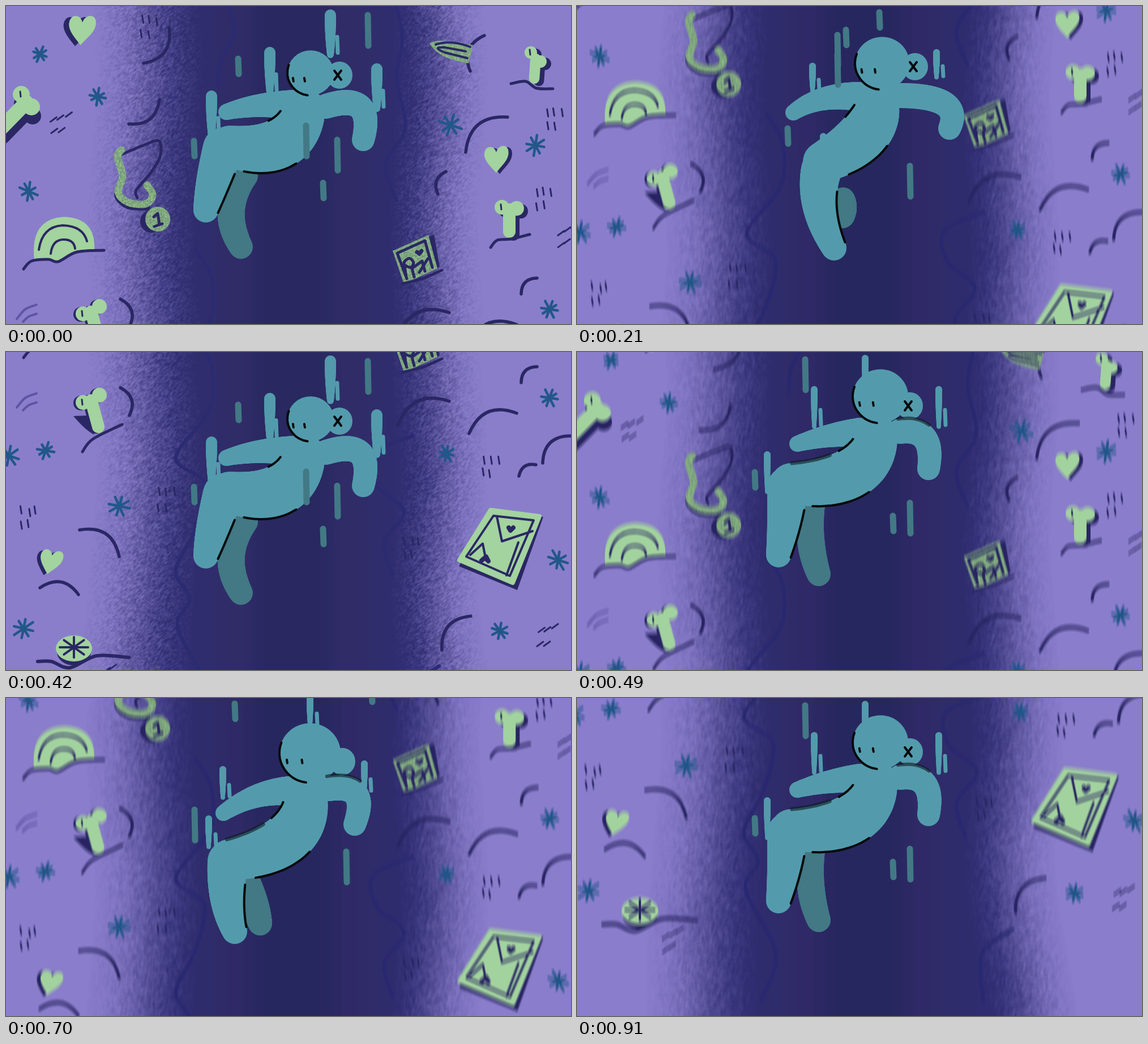
An HTML page with a canvas that plays this animation: 998 px wide and 561 px high, repeating every 980 ms.

```html
<!DOCTYPE html>
<html lang="en">
<head>
<meta charset="utf-8">
<title>Falling</title>
<style>
html, body { margin: 0; width: 100%; height: 100%; overflow: hidden; background: #8a7ecb; }
canvas { display: block; width: 998px; height: 561px; }
</style>
</head>
<body>
<canvas id="stage" width="998" height="561"></canvas>
<script>
const W = 998, H = 561, DEPTH = 1200, STEP = 70, PASS = 7;
const SKIN = '#539bac', SHADE = '#427985', NAVY = '#2a2764', GREEN = '#a3d39e', BLUE = '#225789', INK = '#060a0c';

let seed = 7;
const rnd = () => (seed = (seed * 16807) % 2147483647) / 2147483647;
const clamp = v => Math.max(0, Math.min(1, v));
const points = s => s.split(' ').map(p => p.split(',').map(Number));

function makeCanvas(w, h) {
  const c = document.createElement('canvas');
  c.width = w; c.height = h;
  return c.getContext('2d');
}

function pen(g, path, width, color) {
  g.lineCap = g.lineJoin = 'round';
  g.lineWidth = width;
  g.strokeStyle = color;
  g.stroke(path);
}

// Smooth open curve through points
function line(g, p, width, color) {
  const path = new Path2D(), at = i => p[Math.max(0, Math.min(p.length - 1, i))];
  path.moveTo(...p[0]);
  for (let i = 0; i < p.length - 1; i++) {
    const [a, b, c, d] = [at(i - 1), at(i), at(i + 1), at(i + 2)];
    path.bezierCurveTo(b[0] + (c[0] - a[0]) / 6, b[1] + (c[1] - a[1]) / 6,
      c[0] - (d[0] - b[0]) / 6, c[1] - (d[1] - b[1]) / 6, c[0], c[1]);
  }
  pen(g, path, width, color);
}

function oval(g, x, y, rx, ry, color) {
  g.fillStyle = color;
  g.beginPath();
  g.ellipse(x, y, rx, ry, 0, 0, 7);
  g.fill();
}

function fillPath(g, d, color) {
  g.fillStyle = color;
  g.fill(new Path2D(d));
}

/* ---------- tunnel ---------- */

function paintWalls(g) {
  const w = W / 2, h = DEPTH / 2, n = makeCanvas(w, h), img = n.createImageData(w, h);
  const lav = [138, 126, 203];
  const noise = () => Array.from({ length: w + 1 }, rnd);
  let above = noise();
  for (let j = 0; j < h; j++) {
    const row = noise(), bend = 8 * Math.sin(j / 42), deep = clamp((j - 440) / 130) * 25;
    for (let i = 0; i < w; i++) {
      const x = i * 2, mid = Math.abs(x - 505);
      const u = x < 500 ? clamp((342 - deep + bend - x) / 192) : clamp((x - 684 - deep - bend) / 158);
      const grain = row[i] * .6 + above[i + 1] * .4 - .5;
      const v = clamp(u * u * (3 - 2 * u) + grain * .75 * Math.pow(4 * u * (1 - u), .6));
      const core = clamp((90 - mid) / 45), rim = clamp((mid - 110) / 90);
      const dark = [48 - 7 * core, 44 - 4 * core + 2 * rim, 104 - 8 * core + 10 * rim];
      const o = (j * w + i) * 4;
      dark.forEach((c, k) => img.data[o + k] = c + (lav[k] - c) * v);
      img.data[o + 3] = 255;
    }
    above = row;
  }
  n.putImageData(img, 0, 0);
  g.drawImage(n.canvas, 0, 0, W, DEPTH);
}

function grainyGreen() {
  const t = makeCanvas(96, 96);
  t.fillStyle = '#82aa7d';
  t.fillRect(0, 0, 96, 96);
  for (let i = 0; i < 1400; i++) {
    t.fillStyle = rnd() < .5 ? '#93c08e' : '#6f917a';
    t.fillRect(rnd() * 96, rnd() * 96, 2, 2);
  }
  return t.createPattern(t.canvas, 'repeat');
}

function star(g, x, y) {
  const r = 14 + rnd() * 6;
  for (let i = 0; i < 4; i++) {
    const a = i * Math.PI / 4 + .15 + rnd() * .25, q = r * (.8 + rnd() * .3);
    const dx = Math.cos(a) * q, dy = Math.sin(a) * q;
    line(g, [[x - dx, y - dy], [x + dx, y + dy]], 4.5, BLUE);
  }
}

// Bow from a to b, bulging to the left of the way
function bow(g, [ax, ay], [bx, by]) {
  const dx = bx - ax, dy = by - ay, p = new Path2D();
  p.moveTo(ax, ay);
  p.quadraticCurveTo((ax + bx) / 2 + dy * .48, (ay + by) / 2 - dx * .48, bx, by);
  pen(g, p, 5.5, NAVY);
}

// Two short rows of scratches
function scratches(g, x, y, slant) {
  for (let i = 0; i < 5; i++) {
    const px = x + (i % 3 - 1) * 13 + rnd() * 4, py = y + (i > 2 ? 12 : -12) + rnd() * 6 - slant * (i % 3) * 5;
    line(g, [[px, py], [px + 2 + slant * 9, py + 13 - slant * 21]], 3, NAVY);
  }
}

// Paints a shape twice: shadow, then face
function raised(g, dx, dy, paint) {
  [[dx, dy, NAVY], [0, 0, GREEN]].forEach(([x, y, color]) => {
    g.save();
    g.translate(x, y);
    paint(color);
    g.restore();
  });
}

function heart(g, x, y, s, tilt, side) {
  raised(g, side * 8, 2, color => {
    g.translate(x, y);
    g.rotate(tilt);
    g.scale(s, s);
    fillPath(g, 'M0 28C-12 15-26 2-23-12C-20-26-4-26 0-12C4-28 24-30 24-12C24 4 10 14 0 28', color);
  });
}

function bone(g, a, b, end, r, dx, dy) {
  raised(g, dx, dy, color => {
    oval(g, ...a, r, r, color);
    oval(g, ...b, r, r, color);
    line(g, [[(a[0] + b[0]) / 2, (a[1] + b[1]) / 2 + 3], end], r * 1.7, color);
  });
  line(g, [[a[0] - 2, a[1] - 5], [a[0] - 1, a[1] + 4]], 3, NAVY);
}

function paintThings(g) {
  const dull = grainyGreen();
  const ink = (s, w = 5) => line(g, points(s), w, NAVY);
  const draw = (d, w = 4, color = NAVY) => pen(g, new Path2D(d), w, color);

  // wall contours
  ['395,0 402,50 378,100 374,140', '335,430 363,480 360,555 300,640 350,685 335,765 300,840 325,890 303,940 355,1050 330,1130',
   '690,0 700,60 690,130 705,215 670,280 690,343', '718,602 648,635 655,690 703,735 668,790 683,848', '765,1008 712,1050 714,1132']
    .forEach(s => line(g, points(s), 6, '#2b2b72'));

  ['288,38 243,101', '271,165 217,208', '202,517 218,566', '130,768 200,815', '60,870 128,882',
   '820,115 845,52', '812,258 886,196', '763,332 777,292', '910,508 938,480', '692,584 783,541',
   '818,598 902,562', '948,650 998,602', '906,673 936,653', '770,980 821,920']
    .forEach(s => bow(g, ...points(s)));

  points('250,28 966,190 947,330 280,705 37,738 853,647 714,790').forEach(p => scratches(g, ...p, 0));
  points('90,212 985,412 950,960 170,1032').forEach(p => scratches(g, ...p, 1));
  for (let i = 0; i < 2; i++)
    line(g, [[19 + i * 11, 552 + i * 5], [34 + i * 6, 535 + i * 13], [54, 527 + i * 16]], 4, '#5f54a4');

  points('60,85 162,160 40,327 5,637 70,628 200,726 31,942 785,210 935,246 960,535 778,633 975,821 872,946')
    .forEach(p => star(g, ...p));

  heart(g, 134, 41, 1, .08, -1.2);
  heart(g, 79, 823, .84, .25, -.8);
  heart(g, 866, 269, .9, 0, .8);

  bone(g, [27, 156], [45, 178], [-8, 215], 15, 2, 16);
  bone(g, [927, 82], [944, 98], [933, 128], 11, 8, 4);
  ink('892,137 918,133 937,145 966,146');
  bone(g, [876, 355], [902, 357], [889, 398], 13, 7, 5);
  ink('856,426 868,413 892,411 925,403');
  fillPath(g, 'M119 567L148 566L156 600Q140 592 119 567Z', NAVY);
  bone(g, [136, 543], [165, 530], [163, 586], 13, -4, 1);
  ink('135,630 153,608 205,582');

  // medal
  ink('204,262 240,247 270,238 272,266 255,295 230,325 232,338');
  line(g, points('206,308 196,334 215,353 250,356'), 10, NAVY);
  line(g, points('204,254 197,266 206,300 198,328 215,346 247,349 259,333 249,316'), 13, dull);
  oval(g, 257, 380, 20, 20, NAVY);
  oval(g, 268, 376, 22, 22, dull);
  draw('M261 372L268 366L271 385M262 389L276 384', 5);

  // rainbow
  fillPath(g, 'M50 448Q42 375 103 372Q160 374 156 433L125 432L92 449Z', GREEN);
  draw('M58 430Q64 389 100 387Q136 388 143 415M79 437Q82 412 102 412Q120 412 122 428');
  ink('31,464 45,450 75,447 92,451 125,434 173,431');

  // ball
  oval(g, 120, 983, 30, 24, NAVY);
  oval(g, 120, 977, 32, 23, GREEN);
  for (let a = 0; a < 6.2; a += Math.PI / 4)
    line(g, [[120, 975], [120 + 25 * Math.cos(a), 975 + 18 * Math.sin(a)]], 4, NAVY);
  ink('56,1000 80,1000 113,1011 160,990 217,993', 6);

  // shell
  fillPath(g, 'M748 66Q762 55 825 69L817 101Q765 94 748 66Z', dull);
  draw('M759 68Q785 59 820 72M812 80L775 73Q750 72 775 82L815 92', 4);

  // framed picture
  fillPath(g, 'M696 432L756 403L766 460L708 488Z', NAVY);
  fillPath(g, 'M683 432L746 404L762 463L703 490Z', dull);
  draw('M708 481L691 436L740 414L753 461M707 478L703 452Q714 438 720 453Q718 466 706 458M721 478L717 463L735 450L740 468M730 470L745 446', 5);
  draw('M726 434L730 437L734 432', 7);
  ink('700,490 735,481 770,466');

  // letter
  fillPath(g, 'M856 733L949 745L903 874L800 832Z', NAVY);
  const sheet = 'M856 733L942 744L895 861L801 821Z';
  fillPath(g, sheet, GREEN);
  draw(sheet, 8, GREEN);
  draw('M861 743L932 751L890 849L813 815Z');
  draw('M867 744L876 788L930 770M820 812L842 792L848 822M905 790L884 848');
  draw('M840 822L848 815L852 823M888 764L891 769L896 764', 8);
}

/* ---------- faller ---------- */

// Joints: rear arm, front arm, torso, leg, far leg (three each), snout, head with radius
const sink = {
  joints: points('508,174 445,176 389,187 565,177 625,178 631,236 528,182 483,243 395,247 384,250 366,310 353,360 425,300 398,360 415,425 589,122 538,118,41'),
  drips: points('573,16 466,82 363,159 655,111'), fall: 70, bulb: 10,
  rain: points('639,16 410,93 585,236 332,238 530,211 560,312'), cross: true
};
const rise = {
  joints: points('500,142 445,148 389,162 570,140 614,152 621,206 530,148 484,214 378,232 372,238 366,300 356,358 418,270 413,330 427,392 588,95 536,78,49'),
  drips: points('509,11 419,66 336,181 639,66'), fall: 66, bulb: 6,
  rain: points('403,13 314,212 588,266 558,289'), cross: true, soft: true
};
const tip = {
  joints: points('500,161 443,172 400,193 570,157 615,166 613,211 530,165 500,236 410,268 407,272 407,335 421,385 442,305 450,345 458,373 591,111 539,99,51'),
  drips: points('538,3 398,123 376,205 627,115'), fall: 48, bulb: 6,
  rain: points('352,188 418,11 599,257 639,-14'), soft: true
};
const turn = {
  joints: points('500,160 435,164 382,188 565,158 648,172 658,216 530,165 508,225 435,275 432,288 429,355 454,427 470,340 470,355 469,371 597,107 539,101,48'),
  drips: points('539,90 416,106 435,230 635,82'), fall: 44, bulb: 6,
  rain: points('460,51 475,42 588,282 534,11 460,85 372,216'), cross: true
};
const drop = {
  joints: points('500,164 440,174 384,203 570,160 618,170 616,223 530,168 498,246 395,285 392,288 391,355 404,412 430,325 440,365 449,398 594,112 537,97,54'),
  drips: points('537,0 383,126 358,213 633,116'), fall: 50, bulb: 6,
  rain: points('333,197 404,10 601,271 646,-20'), soft: true
};

const between = (a, b) => a.map((p, i) => p.map((v, k) => (v + b[i][k]) / 2));
const settle = { ...sink, joints: between(drop.joints, sink.joints), drips: between(drop.drips, sink.drips) };
const cycle = [sink, rise, tip, turn, drop, settle];

// Tapered limb: position and radius follow one curve through three joints
function limb(joints, radii) {
  const [a, m, c] = joints.map((p, i) => [p[0], p[1], radii[i]]);
  const ctl = m.map((v, k) => 2 * v - (a[k] + c[k]) / 2);
  const at = t => a.map((v, k) => v * (1 - t) ** 2 + 2 * t * (1 - t) * ctl[k] + c[k] * t * t);
  const edge = (sign, from, to) => Array.from({ length: 9 }, (_, i) => {
    const t = from + (to - from) * i / 8, [x, y, r] = at(t), [x2, y2] = at(t + .01);
    const dx = x2 - x, dy = y2 - y, q = sign * r / Math.hypot(dx, dy);
    return [x + dy * q, y - dx * q];
  });
  const paint = (g, color) => {
    for (let i = 0; i <= 60; i++) {
      const [x, y, r] = at(i / 60);
      oval(g, x, y, r, r, color);
    }
  };
  return { edge, paint };
}

function drawFaller(g, { joints, drips, fall, bulb, rain, cross, soft }) {
  const part = (i, ...radii) => limb(joints.slice(i * 3, i * 3 + 3), radii);
  const rear = part(0, 26, 20, 14), front = part(1, 22, 22, 20), torso = part(2, 36, 45, 36);
  const leg = part(3, 36, 30, 22), far = part(4, 20, 24, 21);
  const [snout, [hx, hy, r]] = joints.slice(15);
  const bar = (x, y, len, w, color) => line(g, [[x, y], [x + 1, y + len]], w, color);

  far.paint(g, SHADE);
  drips.forEach(([x, y], i) => {
    limb([[x, y], [x, y + fall / 2], [x, y + fall]], [bulb, bulb * .9, bulb * .6]).paint(g, SKIN);
    bar(x + (i % 2 ? 11 : 12), y + fall * .55, fall * .4, 7, SKIN);
  });
  [rear, front, torso, leg].forEach(p => p.paint(g, SKIN));
  oval(g, hx, hy, r, r * .97, SKIN);
  oval(g, ...snout, 23, 24, SKIN);
  rain.forEach(([x, y], i) => bar(x, y, i % 2 ? 27 : 54, 11, SHADE));

  if (soft) {
    line(g, torso.edge(-1, .65, 1), 7, 'rgba(14,28,34,.6)');
    line(g, front.edge(1, 0, .4), 6, 'rgba(14,28,34,.6)');
  }
  line(g, torso.edge(-1, .12, .5), 4, INK);
  line(g, torso.edge(1, .45, .86), 4, INK);
  line(g, leg.edge(1, .3, 1), 4, INK);
  g.beginPath();
  g.ellipse(hx, hy, r, r * .97, 0, 1.7, 3.5);
  g.lineWidth = 4;
  g.stroke();

  [.76, .27].forEach(k => bar(hx - r * k, hy + r * .22, 6, 4, INK));
  if (cross) [-1, 1].forEach(s => line(g, [[snout[0] - 3 - 6 * s, snout[1] - 8], [snout[0] - 3 + 6 * s, snout[1] + 8]], 4, INK));
}

/* ---------- playback ---------- */

// Two passes down the tunnel: one slows down, one speeds up and ends in a slight push-in
function camera(i) {
  if (i < PASS) return { y: 80 * i - .02 * i ** 4, zoom: 1 };
  const j = i - PASS;
  return { y: 70.4 + 79 * j + 1.63 * j * j, zoom: 1 + .021 * (j / 6) ** 5 };
}

const tunnel = makeCanvas(W, DEPTH);
paintWalls(tunnel);
paintThings(tunnel);

const ctx = document.getElementById('stage').getContext('2d');
let shown = -1;

function draw(i) {
  const { y, zoom } = camera(i), blur = i % 6 ? [-4.5, -2.2, 0, 2.2, 4.5] : [0];
  ctx.setTransform(zoom, 0, 0, zoom, 545 * (1 - zoom), H / 2 * (1 - zoom));
  blur.forEach((d, n) => {
    ctx.globalAlpha = 1 / (n + 1);
    ctx.drawImage(tunnel.canvas, 0, d - y);
  });
  ctx.globalAlpha = 1;
  ctx.setTransform(1, 0, 0, 1, 0, 0);
  drawFaller(ctx, cycle[i % 6]);
}

const start = performance.now();
function tick() {
  const i = Math.floor((performance.now() - start) / STEP) % (2 * PASS);
  if (i !== shown) draw(shown = i);
  requestAnimationFrame(tick);
}
tick();
</script>
</body>
</html>
```
